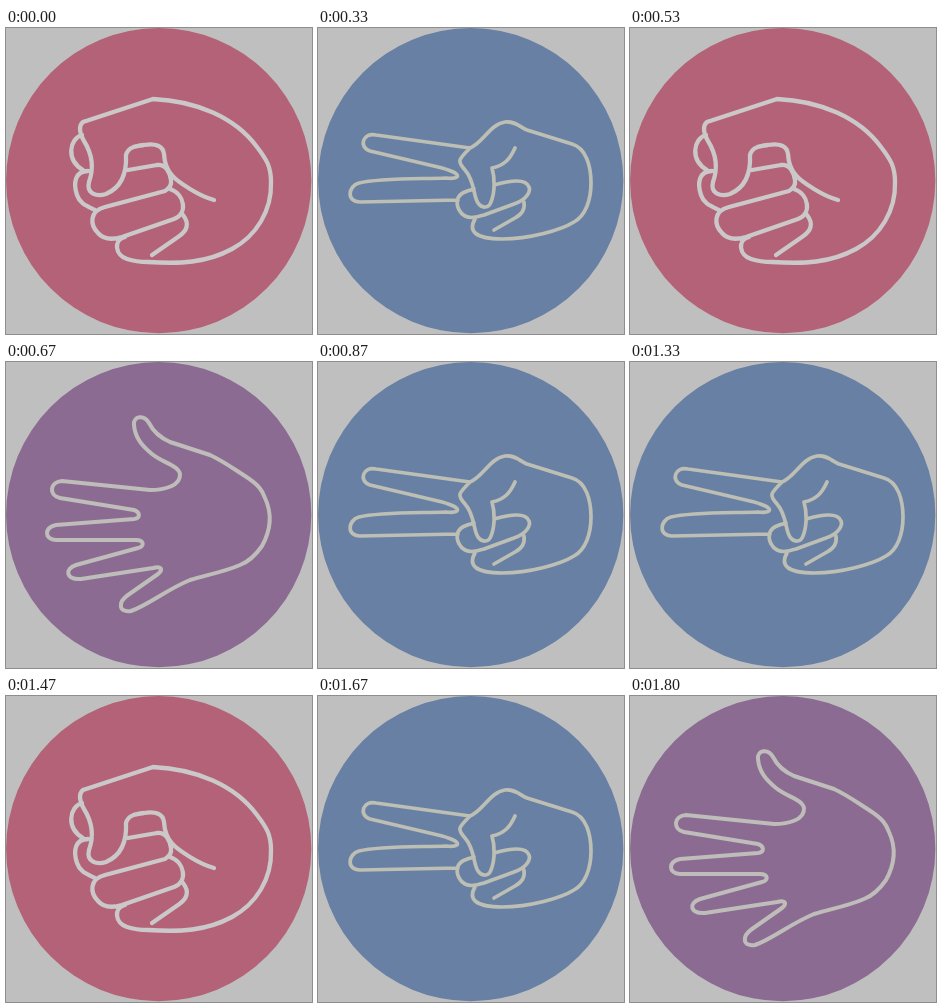
These frames come from a looping animation (306 by 306 pixels, 1990 ms). An HTML page with a canvas:

```html
<!DOCTYPE html>
<html lang="en">
<head>
<meta charset="utf-8">
<title>Rock, paper, scissors</title>
<style>
  html, body { margin: 0; width: 100%; height: 100%; overflow: hidden; background: #bfbfbf; }
  canvas { display: block; width: 306px; height: 306px; }
</style>
</head>
<body>
<canvas id="stage" width="306" height="306"></canvas>
<script>
const ctx = document.getElementById('stage').getContext('2d');
const LOOP = 1990;

const hand = (fill, line, width, ...parts) =>
  ({ fill, line, width, path: new Path2D(parts.join(' ')) });

const signs = {
  R: hand('#b46278', '#cbc8c9', 4.3,
    // back of the hand
    'M77 94 L147 71 C190 73 229 89 251 119 C261 132 265 139 265 154',
    'C266 183 250 208 226 221 C200 235 174 236 142 234',
    // thumb and inner crease
    'M77 94 C72 98 74 107 78 113 C88 129 87 143 83 154 C80 166 91 169 100 166',
    'C114 160 121 147 120 127 C122 119 130 118 138 117 C150 115 157 118 158 126',
    'C159 146 171 153 184 161 Q197 169 208 172',
    // far knuckles
    'M76 107 C63 111 60 132 77 142',
    'M82 143 C69 143 67 155 71 167 C74 176 81 178 89 182',
    // curled fingers
    'M122 142 L151 137 C160 136 164 145 165 152 Q166 159 159 163 L99 179',
    'C83 183 84 197 92 205 C98 212 106 212 116 209 L168 191 C182 186 179 166 164 161',
    'M119 209 C107 212 109 227 121 231 Q130 234 142 234',
    'M177 187 C184 196 181 203 172 209 L146 227'),

  P: hand('#8b6b92', '#bebdba', 4,
    'M128 63 C127 54 138 52 143 61 C148 71 155 76 164 80 L204 93',
    'C217 99 228 107 239 114 C253 123 256 128 259 136 C266 151 266 166 256 184',
    'C249 194 242 200 234 203 C218 210 200 213 184 218 C160 228 142 243 125 249',
    'C112 251 112 240 122 233 L152 212 C158 207 155 204 147 206 L75 217',
    'C60 218 58 207 70 203 L132 186 C139 184 138 178 130 178 L50 178',
    'C38 177 38 166 50 163 L128 157 C135 156 134 150 128 148 L54 136',
    'C42 133 44 120 56 119 L144 128 C158 128 175 124 174 112',
    'C172 103 157 101 146 92 C135 83 129 75 128 63 Z'),

  S: hand('#6780a3', '#bdbeb4', 3.7,
    // two stretched fingers
    'M152 120 L58 107 C45 104 40 119 52 123 L120 139 C128 141 142 145 139 149',
    'Q136 151 128 150 C100 151 61 150 41 155 C30 158 28 174 42 174 L140 172',
    // back of the hand
    'M152 120 C165 115 172 96 187 94 C197 93 202 99 209 102 L254 116',
    'C268 120 273 138 273 155 C273 173 267 188 256 194 C243 202 212 211 184 211',
    'C157 211 150 203 157 191',
    // thumb
    'M152 120 C140 132 139 133 147 142 C157 153 155 168 160 175',
    'C164 181 171 180 173 174 C177 164 177 150 174 140 C187 137 192 131 197 120',
    // curled fingers
    'M156 161 C148 163 142 165 140 170 C137 179 143 186 147 188 C153 191 159 189 166 187',
    'L196 176 C208 172 213 164 211 159 C208 150 190 153 176 157',
    'M206 174 C207 182 204 186 197 190 L176 202')
};

// start time of each pose
const cues = [
  [0, 'R'], [200, 'P'], [330, 'S'], [530, 'R'], [670, 'P'], [870, 'S'],
  [1000, 'R'], [1130, 'P'], [1330, 'S'], [1470, 'R'], [1670, 'S'], [1800, 'P']
];

function draw(sign) {
  ctx.fillStyle = '#bfbfbf';
  ctx.fillRect(0, 0, 306, 306);
  ctx.beginPath();
  ctx.arc(152.7, 152.7, 152.6, 0, Math.PI * 2);
  ctx.fillStyle = sign.fill;
  ctx.fill();
  ctx.lineCap = ctx.lineJoin = 'round';
  ctx.strokeStyle = sign.line;
  ctx.lineWidth = sign.width;
  ctx.stroke(sign.path);
}

const start = performance.now();
function tick() {
  const t = (performance.now() - start) % LOOP;
  const key = cues.filter(([at]) => at <= t).pop()[1];
  draw(signs[key]);
  requestAnimationFrame(tick);
}
tick();
</script>
</body>
</html>
```
